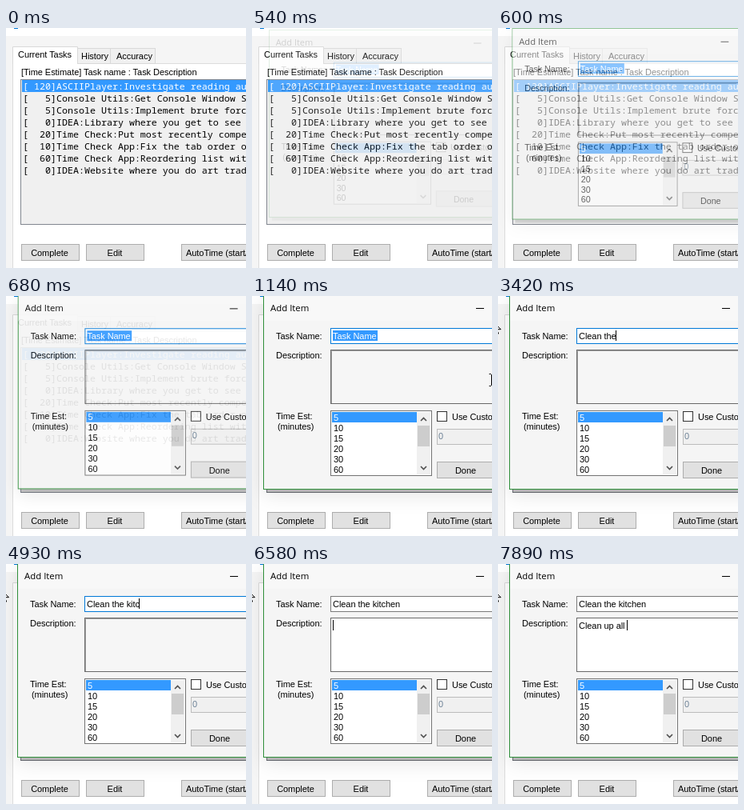
An HTML page for the animation above (8000 ms loop, 300 by 300 pixels).

```html
<!DOCTYPE html>
<html lang="en">
<head>
<meta charset="utf-8">
<title>Task list</title>
<style>
  html, body { margin: 0; width: 100%; height: 100%; overflow: hidden; background: #f0f0f0; }
  svg { display: block; width: 100vw; height: 100vh; }
  text { font: 11px "Liberation Sans", Arial, sans-serif; letter-spacing: -.05px; white-space: pre; }
  .mono { font: 11.67px "Noto Sans Mono", "DejaVu Sans Mono", monospace; letter-spacing: 0; }
  .caption { font: 11.4px "Open Sans", sans-serif; letter-spacing: 0; }
  .button { fill: #e1e1e1; stroke: #adadad; }
  .tab { fill: #f0f0f0; stroke: #d9d9d9; }
  .mid { text-anchor: middle; }
  .pick { fill: #3399ff; }
  .lit { fill: #fff; }
  .frame { filter: drop-shadow(4px 4px 0 rgba(0, 0, 0, .2)) drop-shadow(0 6px 12px rgba(0, 0, 0, .1)); }
  #dialog { transform-origin: 200px 110px; }
</style>
</head>
<body>
<svg viewBox="0 0 300 300">
  <g id="main">
    <rect width="300" height="300" fill="#f5f5f5"/>
    <rect width="300" height="10" fill="#fff"/>
    <rect x="10" width="5" height="1" fill="#0078d7"/>
    <rect x="8.5" y="44.5" width="320" height="300" fill="#fff" stroke="#dcdcdc"/>
    <rect class="tab" x="88.5" y="25.5" width="42" height="19"/>
    <rect class="tab" x="130.5" y="25.5" width="56" height="19"/>
    <path d="M8.5 45V23.5H89.5V45" fill="#fff" stroke="#d9d9d9"/>
    <text x="15" y="37">Current Tasks</text>
    <text x="94" y="39">History</text>
    <text x="138" y="39">Accuracy</text>
    <text x="19" y="59">[Time Estimate] Task name : Task Description</text>
    <rect x="18.5" y="64.5" width="300" height="181" fill="#f0f0f0" stroke="#828790"/>
    <rect class="pick" x="20" y="65" width="290" height="15"/>
    <g id="tasks"></g>
    <rect class="button" x="19.5" y="270.5" width="72" height="20"/>
    <rect class="button" x="100.5" y="270.5" width="72" height="20"/>
    <rect class="button" x="219.5" y="270.5" width="100" height="20"/>
    <text class="mid" x="54.5" y="285">Complete</text>
    <text class="mid" x="136" y="285">Edit</text>
    <text x="225" y="285">AutoTime (start/stop)</text>
  </g>

  <g id="dialog">
    <rect class="frame" x="14.5" y="-1.5" width="371" height="243" fill="#f5f5f5" stroke="#2f8f3a"/>
    <rect x="15" y="-1" width="370" height="32" fill="#f8f8f8"/>
    <text class="caption" x="23" y="19">Add Item</text>
    <path d="M280 15.5h10" stroke="#000"/>

    <text x="30" y="54">Task Name:</text>
    <rect id="nameBox" x="98.5" y="40.5" width="250" height="19" fill="#fff"/>
    <rect id="selection" class="pick" x="101" y="43" width="56" height="13"/>
    <text id="name" x="101" y="54"></text>

    <text x="30" y="78">Description:</text>
    <rect id="noteBox" x="98.5" y="67.5" width="250" height="67" stroke="#696969"/>
    <path id="noteEdge" d="M99.5 134V68.5H300" fill="none" stroke="#a0a0a0"/>
    <text id="note" x="101" y="81"></text>
    <rect id="caret" width="1" height="13"/>

    <text x="30" y="154">Time Est:</text>
    <text x="32" y="167">(minutes)</text>
    <rect x="98.5" y="143.5" width="126" height="81" fill="#fff" stroke="#737373"/>
    <rect class="pick" x="100" y="145" width="106" height="13"/>
    <g id="minutes"></g>
    <rect x="206" y="145" width="17" height="78" fill="#f0f0f0"/>
    <rect x="207" y="162" width="15" height="26" fill="#cdcdcd"/>
    <path d="M211 156l3.5-3.5 3.5 3.5M211 213l3.5 3.5 3.5-3.5" fill="none" stroke="#505050" stroke-width="1.6"/>

    <rect x="231.5" y="144.5" width="12" height="12" fill="#fff" stroke="#333"/>
    <text x="250" y="155">Use Custom Time</text>
    <rect x="231.5" y="166.5" width="100" height="19" fill="#f0f0f0" stroke="#bcbcbc"/>
    <text x="233" y="178.5" fill="#6d8296">0</text>
    <rect class="button" x="231.5" y="207.5" width="73" height="20"/>
    <text class="mid" x="267" y="222">Done</text>
  </g>

  <path id="arrow" d="M.5.5V16L4 12.5 6.5 18 8.7 17 6.3 11.7H11.5Z" fill="#fff" stroke="#000"/>
  <path id="beam" d="M-3-7.5H-1L0-6.5 1-7.5H3M0-6.5V6.5M-3 7.5H-1L0 6.5 1 7.5H3" fill="none" stroke="#000"/>
</svg>
<script>
const LOOP = 8000;
const $ = id => document.getElementById(id);
const clamp = v => Math.min(1, Math.max(0, v));
const lerp = (a, b, k) => a + (b - a) * k;
const mix = (a, b, k) => `rgb(${a.map((v, i) => Math.round(lerp(v, b[i], k)))})`;

function addRows(id, rows, x, y, pitch, cls) {
  rows.forEach((row, i) => {
    const el = document.createElementNS("http://www.w3.org/2000/svg", "text");
    el.textContent = row;
    el.setAttribute("x", x);
    el.setAttribute("y", y + i * pitch);
    el.setAttribute("class", i ? cls : cls + " lit");
    $(id).append(el);
  });
}

addRows("tasks", [
  "[ 120]ASCIIPlayer:Investigate reading au",
  "[   5]Console Utils:Get Console Window S",
  "[   5]Console Utils:Implement brute forc",
  "[   0]IDEA:Library where you get to see ",
  "[  20]Time Check:Put most recently compe",
  "[  10]Time Check App:Fix the tab order o",
  "[  60]Time Check App:Reordering list wit",
  "[   0]IDEA:Website where you do art trad"
], 21, 77, 15, "mono");
addRows("minutes", ["5", "10", "15", "20", "30", "60"], 102, 155.5, 13, "");

// [time, text in the field from then on]
const nameKeys = [
  [0, "Task Name"], [2760, "C"], [2860, "Cl"], [2950, "Cle"], [3040, "Clea"],
  [3130, "Clean"], [3230, "Clean "], [3320, "Clean th"], [3420, "Clean the"],
  [3470, "Clean the "], [3530, "Clean the k"], [3710, "Clean the kti"],
  [3770, "Clean the ktic"], [3950, "Clean the ktich"], [4230, "Clean the ktic"],
  [4350, "Clean the kti"], [4470, "Clean the k"], [4750, "Clean the kit"],
  [4930, "Clean the kitc"], [5020, "Clean the kitch"], [5150, "Clean the kitche"],
  [5260, "Clean the kitchen"]
];
const noteTimes = [6730, 6810, 6880, 6960, 7030, 7170, 7200, 7410, 7500, 7650, 7710, 7860, 7890];
const noteText = "Clean up all ";

// [time, x, y]
const mousePath = [
  [970, 290, 209], [1060, 287, 160], [1140, 299, 105], [1230, 312, 60],
  [1440, 298, 76], [1520, 262, 60], [1570, 222, 48], [1610, 231, 50],
  [1760, 231, 50], [2000, 90, 32], [2120, 40, 26], [2260, -8, 30]
];

function mouseAt(t) {
  const i = mousePath.findIndex(p => p[0] > t);
  if (i < 0) return mousePath.at(-1).slice(1);
  if (i === 0) return [320, 209];
  const [a, b] = [mousePath[i - 1], mousePath[i]];
  const k = (t - a[0]) / (b[0] - a[0]);
  return [lerp(a[1], b[1], k), lerp(a[2], b[2], k)];
}

function drawDialog(t) {
  const left = (1 - clamp((t - 525) / 235)) ** 2.2;
  $("dialog").style.opacity = t < 540 ? 0 : 1 - left;
  $("dialog").style.transform = left ? `scale(${1 - .044 * left})` : "none";
}

function drawFields(t) {
  const selected = t < 2760;
  const inNote = t >= 5540;
  const focus = clamp((t - 5540) / 230);
  $("name").textContent = nameKeys.findLast(k => k[0] <= t)[1];
  $("name").setAttribute("fill", selected ? "#fff" : "#000");
  $("note").textContent = noteText.slice(0, noteTimes.filter(k => k <= t).length);
  $("selection").style.opacity = selected ? 1 : 0;
  $("nameBox").setAttribute("stroke", mix([0, 120, 215], [122, 122, 122], focus));
  $("noteBox").setAttribute("fill", mix([246, 246, 246], [255, 255, 255], focus));
  $("noteEdge").style.opacity = 1 - focus;

  const field = inNote ? $("note") : $("name");
  const end = field.textContent ? field.getComputedTextLength() : 1;
  const blinkedOff = t >= 6050 && t < 6580;
  $("caret").setAttribute("x", Math.round(100 + end));
  $("caret").setAttribute("y", inNote ? 70 : 43);
  $("caret").style.opacity = selected || blinkedOff ? 0 : 1;
}

function drawMouse(t) {
  const [x, y] = mouseAt(t).map(Math.round);
  const overField = x > 98 && (y > 40 && y < 60 || y > 67 && y < 135);
  $("arrow").style.opacity = overField ? 0 : 1;
  $("beam").style.opacity = overField ? 1 : 0;
  $("arrow").setAttribute("transform", `translate(${x} ${y})`);
  $("beam").setAttribute("transform", `translate(${x + .5} ${y})`);
}

const start = performance.now();
function draw() {
  const t = (performance.now() - start) % LOOP;
  drawDialog(t);
  drawFields(t);
  drawMouse(t);
  requestAnimationFrame(draw);
}
draw();
</script>
</body>
</html>
```
